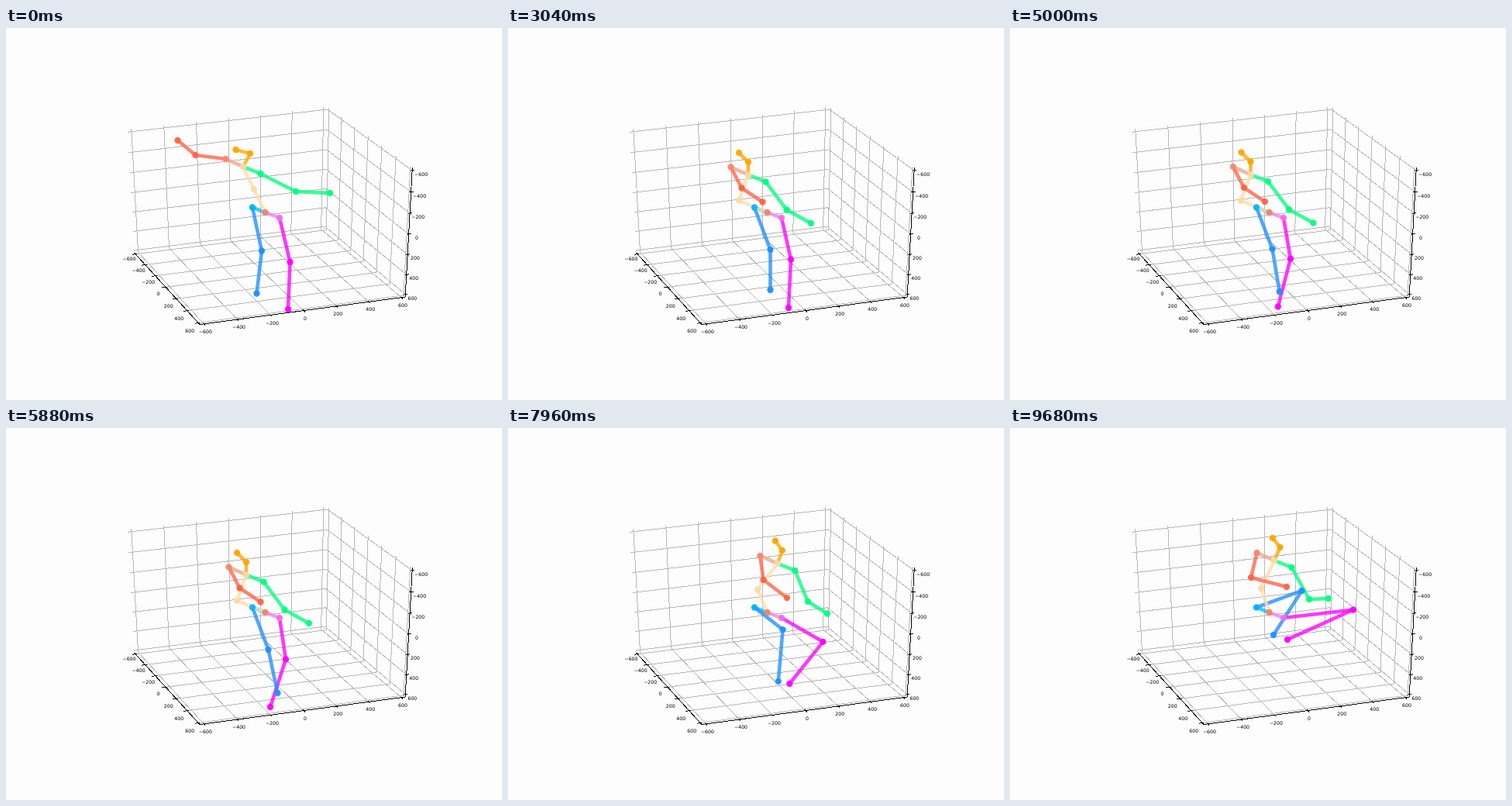
Recreate the animation shown at these times as an HTML page. Size 640 px wide and 480 px high, loop 9.72 s.

```html
<!DOCTYPE html>
<html lang="en">
<head>
<meta charset="utf-8">
<title>Pose in 3D</title>
<style>
html, body { margin: 0; width: 100%; height: 100%; overflow: hidden; background: #fdfdfd; }
svg { display: block; width: 640px; height: 480px; }
text { font: 6.2px "DejaVu Sans", sans-serif; text-anchor: middle; fill: #000; }
</style>
</head>
<body>
<svg viewBox="0 0 640 480">
  <g id="grid" stroke="#b8b8b8" shape-rendering="crispEdges"></g>
  <g id="axes" stroke="#000" shape-rendering="crispEdges"></g>
  <g id="labels"></g>
  <g id="bones" stroke-width="4.6" stroke-opacity=".78" stroke-linecap="square"></g>
  <g id="dots" fill-opacity=".9"></g>
</svg>
<script>
const LOOP = 9720, STEP = 40;

function add(parent, tag, attrs, text) {
  const el = document.createElementNS('http://www.w3.org/2000/svg', tag);
  set(el, attrs);
  if (text) el.textContent = text;
  document.getElementById(parent).append(el);
  return el;
}

function set(el, attrs) {
  for (const k in attrs) el.setAttribute(k, attrs[k]);
}

// Perspective of the unit box: u to the right, v to the viewer, w up.
// Each corner holds x, y and its depth weight.
const O = [165.5, 290, 1], U = [411.5, 259, 1.02], V = [250, 382.6, .92], W = [156.5, 131, .952];

function project(u, v, w) {
  const sum = i => {
    const part = c => i < 2 ? c[i] * c[2] : c[2];
    const o = part(O);
    return o + u * (part(U) - o) + v * (part(V) - o) + w * (part(W) - o);
  };
  const d = sum(2);
  return [sum(0) / d, sum(1) / d];
}

function line(parent, a, b) {
  const [x1, y1] = project(...a), [x2, y2] = project(...b);
  add(parent, 'line', { x1, y1, x2, y2 });
}

function label(value, at, dx, dy) {
  const [x, y] = project(...at);
  const text = value < 0 ? '\u2212' + -value : String(value);
  add('labels', 'text', { x: x + dx, y: y + dy + 2.2 }, text);
}

function drawBox() {
  for (let n = -600; n <= 600; n += 200) {
    const p = (n + 625) / 1250, q = 1 - p;
    line('grid', [p, 1, 0], [p, 0, 0]);
    line('grid', [p, 0, 0], [p, 0, 1]);
    line('grid', [0, p, 0], [1, p, 0]);
    line('grid', [1, p, 0], [1, p, 1]);
    line('grid', [0, 0, q], [1, 0, q]);
    line('grid', [1, 0, q], [1, 1, q]);
    line('axes', [p, .992, 0], [p, 1.017, 0]);
    line('axes', [.008, p, 0], [-.017, p, 0]);
    line('axes', [.992, 1, q], [1.012, 1, q]);
    label(n, [p, 1, 0], 2, 10);
    label(n, [0, p, 0], -8 - 3 * p, 6.3 + 4.2 * p);
    label(n, [1, 1, q], 9 + 2.5 * q, 5);
  }
  line('axes', [0, 1, 0], [1, 1, 0]);
  line('axes', [0, 0, 0], [0, 1, 0]);
  line('axes', [1, 1, 0], [1, 1, 1]);
}

function ease(t, from, to) {
  const s = Math.min(1, Math.max(0, (t - from) / (to - from)));
  return s * s * (3 - 2 * s);
}

function bump(t, mid, radius) {
  const d = Math.min(1, Math.abs(t - mid) / radius);
  return (1 + Math.cos(Math.PI * d)) / 2;
}

// The figure reaches out, bends, takes a step, rises and lifts its legs.
function phases(t) {
  const rise = ease(t, 6400, 7900);
  return {
    shifts: [ease(t, 900, 2700), rise, ease(t, 7800, 9450)],
    step: ease(t, 3040, 5880) * (1 - rise),
    sway: bump(t, 4200, 1100),
    swing: bump(t, 1760, 900)
  };
}

const joints = { root: { at: [334.5, 238], dot: dot('#f08068') } };

function dot(fill) {
  return add('dots', 'circle', { r: 4.2, fill });
}

// offsets: the bone as dx, dy from its parent when reaching, bent, risen, lifted;
// a single offset is a stiff bone. drift: extra movement driven by one phase.
function bone(name, from, color, offsets, drift = {}, stroke = color) {
  joints[name] = { from, offsets, drift, line: add('bones', 'line', { stroke }), dot: dot(color) };
}

const BLUE = '#1e90ff', PINK = '#ff00ff', GREEN = '#00ff7f', RED = '#ff6347',
  GOLD = '#ffa500', SAND = '#ffdead';

bone('hipL', 'root', '#ee72ee', [[18.5, 7]], {}, '#ee82ee');
bone('kneeL', 'hipL', PINK, [[13.5, 57], [12, 53.5], [52.5, 32], [90, -10.5]], { step: [-4, 0], sway: [0, -4] });
bone('footL', 'kneeL', PINK, [[-2.5, 61], [-3, 62.5], [-42, 54.5], [-85, 38.5]], { step: [-17, -1] });
bone('hipR', 'root', '#00b4f8', [[-16.5, -6.5]], {}, '#00bfff');
bone('kneeR', 'hipR', BLUE, [[12, 56], [20.5, 54.5], [36, 30], [58.5, -21.5]], { sway: [0, -5] });
bone('footR', 'kneeR', BLUE, [[-6.5, 55], [0, 52], [-5, 67], [-36.5, 57]], { step: [12, 4] });

bone('spine', 'root', '#fcd9a6', [[-14.5, -30], [-36.5, -15.5], [-12.5, -29.5], [-10.5, -31]], {}, SAND);
bone('neck', 'spine', '#ffdba8', [[-14, -29], [12, -33], [26, -33.5], [17, -36]], { sway: [2.5, -2.5] }, SAND);
bone('nose', 'neck', GOLD, [[9, -17], [0, -16.5], [6, -17], [7.5, -17]]);
bone('head', 'nose', GOLD, [[-18.5, -5], [-12, -12], [-9, -12.5], [-9.5, -12]]);

bone('shoulderL', 'neck', GREEN, [[22.5, 9]]);
bone('elbowL', 'shoulderL', GREEN, [[45.5, 23], [27, 36], [16.5, 40], [22.5, 41]], { swing: [2, 6] });
bone('wristL', 'elbowL', GREEN, [[44, 2], [31.5, 17.5], [25, 16], [25, -1]], { swing: [11, 7] });
bone('shoulderR', 'neck', '#f58a70', [[-22.5, -10]], {}, '#f2a285');
bone('elbowR', 'shoulderR', RED, [[-39, -5], [14, 27], [4.5, 31], [-7.5, 32]]);
bone('wristR', 'elbowR', RED, [[-23, -19], [27, 18], [30, 23.5], [46, 12]]);

function place(j, phase) {
  return joints[j.from].at.map((base, c) => {
    let v = base + j.offsets[0][c];
    for (let i = 1; i < j.offsets.length; i++)
      v += (j.offsets[i][c] - j.offsets[i - 1][c]) * phase.shifts[i - 1];
    for (const k in j.drift) v += j.drift[k][c] * phase[k];
    return v;
  });
}

function draw(t) {
  const phase = phases(t);
  for (const j of Object.values(joints)) {
    if (j.from) {
      j.at = place(j, phase);
      const [x1, y1] = joints[j.from].at;
      set(j.line, { x1, y1, x2: j.at[0], y2: j.at[1] });
    }
    set(j.dot, { cx: j.at[0], cy: j.at[1] });
  }
}

const start = performance.now();
function tick() {
  const t = (performance.now() - start) % LOOP;
  draw(Math.floor(t / STEP) * STEP);
  requestAnimationFrame(tick);
}

drawBox();
draw(0);
requestAnimationFrame(tick);
</script>
</body>
</html>
```
